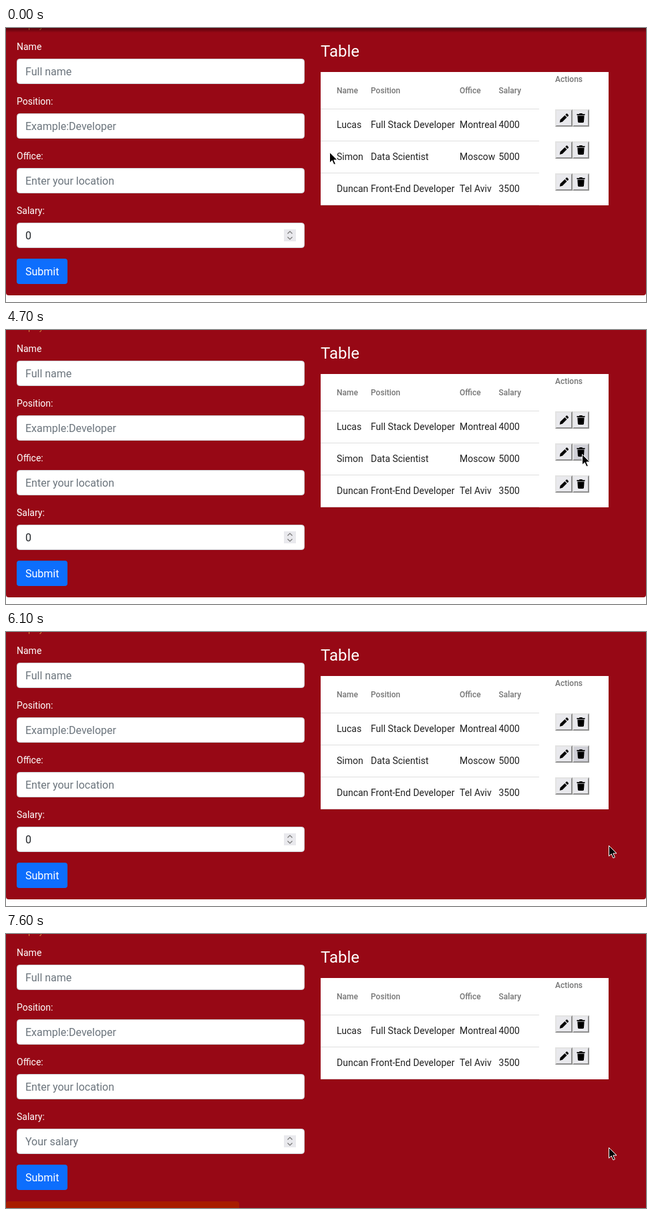
An HTML page that plays this animation: 958x411 px, repeating every 8 s.

```html
<!DOCTYPE html>
<html lang="en">
<head>
<meta charset="utf-8">
<style>
  html, body { margin: 0; width: 100%; height: 100%; overflow: hidden; background: #fff; }
  svg { display: block; width: 958px; height: 411px; font-family: Roboto, sans-serif; white-space: pre; }
  .dialog { font-family: "Noto Sans", sans-serif; }
</style>
</head>
<body>
<svg id="stage" viewBox="0 0 958 411"></svg>
<script>
const LOOP = 8000, STEP = 100;
const RED = '#970815';
const people = [
  ['Lucas', 'Full Stack Developer', 'Montreal', '4000'],
  ['Simon', 'Data Scientist', 'Moscow', '5000'],
  ['Duncan', 'Front-End Developer', 'Tel Aviv', '3500'],
];
const columns = [495, 546, 679, 737.5];
const headers = ['Name', 'Position', 'Office', 'Salary'];

const text = (x, y, str, size, fill, extra = '') =>
  `<text x="${x}" y="${y}" font-size="${size}" fill="${fill}" ${extra}>${str}</text>`;
const rect = (x, y, w, h, fill, extra = '') =>
  `<rect x="${x}" y="${y}" width="${w}" height="${h}" fill="${fill}" ${extra}/>`;
const path = (d, fill, extra = '') => `<path d="${d}" fill="${fill}" ${extra}/>`;
const group = (x, y, body) => `<g transform="translate(${x} ${y})">${body}</g>`;
const bold = 'font-weight="700"', medium = 'font-weight="500"';

const pencil =
  path('M.3 13.7 1.2 9.6 7.9 2.9 11.1 6.1 4.4 12.8z', '#000') +
  path('M8.8 2 10 .8q.9-.9 1.8 0l1.4 1.4q.9.9 0 1.8L12 5.2z', '#000');
const trash =
  path('M0 1.1h3.4l.7-1.1h3.8l.7 1.1H12v1.6H0z', '#000') +
  path('M.9 3.6h10.2l-.6 9q-.1 1.4-1.4 1.4H2.9q-1.3 0-1.4-1.4z', '#000');
const arrow = path('M.5.5V16.2l3.7-3.4 2.7 6.2 2.5-1.1-2.6-5.9H12z', '#000', 'stroke="#fff" stroke-linejoin="round"');
const hand = path('M4 2Q4 .5 5.4.5T6.8 2v4.2l6.6 1.2q2 .4 2 2.2l-.9 4V17H6.2v-2.2L.9 9.9q-.6-1.2.5-1.7 1-.3 2.6 1.5z',
    '#000', 'stroke="#fff" stroke-linejoin="round"') +
  path('M7.3 7v3M10.1 7.6V10M12.7 8.2V10', 'none', 'stroke="#fff" stroke-width=".6"');

function field(label, y, value, filled) {
  return text(16, y - 13, label, 14, '#fff') +
    rect(16.5, y + .5, 430, 37, '#fff', 'rx="4" stroke="#ced4da"') +
    text(29, y + 25, value, 16, filled ? '#212529' : '#6c757d');
}

function button(x, y, w, icon, hovered) {
  return rect(x, y, w, 26, '#e3e3e3') +
    path(`M${x} ${y + 26}h${w}v-26l-2 2v22h${4 - w}z`, '#8f8f8f') +
    rect(x + 2, y + 2, w - 4, 22, hovered ? '#d0d0d7' : '#e9e9ed') +
    group(x + 6.5, y + 6, icon);
}

function table(rows, hoveredRow) {
  let out = rect(471, 66, 431, 56 + rows.length * 48, '#fff') +
    text(822, 81, 'Actions', 12, '#757575', medium);
  headers.forEach((h, i) => out += text(columns[i], 98, h, 12, '#757575', medium));
  rows.forEach((row, r) => {
    const y = 121 + r * 48;
    row.forEach((cell, i) => out += text(columns[i], y + 29, cell, 14, '#212121'));
    out += button(822, y + 1, 26, pencil, false) + button(848, y + 1, 25, trash, r === hoveredRow);
  });
  for (let r = 0; r <= rows.length; r++) out += rect(471, 121 + r * 48, 327, 1, '#e0e0e0');
  return out;
}

function page(t) {
  const deleted = t >= 7200, growing = t >= 7400;
  const hoveredRow = t >= 800 && t < 2400 ? 2 : t >= 3200 && t < 6200 ? 1 : -1;
  const cleared = t >= 6200;
  let out = rect(0, -10, 958, growing ? 430 : 411, RED, 'rx="4"');
  if (growing) {
    const shown = Math.min(1, (t - 7300) / 300);
    out += rect(0, 401, 349, 20, '#a81c00', `rx="4" opacity="${shown}"`);
  }
  out += text(16, 0, 'Employee', 12, '#d08a3c');
  if (t < 4700) out += rect(0, 0, 958, 7, 'url(#shade)');
  out += field('Name', 46, 'Full name') +
    field('Position:', 128, 'Example:Developer') +
    field('Office:', 210, 'Enter your location') +
    field('Salary:', 292, cleared ? 'Your salary' : '0', !cleared) +
    rect(416, 302, 18, 18, '#e9e9ed') +
    path('M421.5 308.5l3.5-3.5 3.5 3.5M421.5 313.5l3.5 3.5 3.5-3.5', 'none', 'stroke="#777" stroke-width="1.2"') +
    rect(16, 346, 76, 38, '#0d6efd', 'rx="4"') +
    text(29, 371, 'Submit', 16, '#fff') +
    text(471, 43, 'Table', 24, '#fff');
  return out + table(deleted ? [people[0], people[2]] : people, hoveredRow);
}

function dialog(y, height, okColor, withCheckbox) {
  const buttonY = height - 51;
  let body = rect(0, 0, 499, height, '#42414d', 'rx="8"') +
    `<g fill="none" stroke="#fbfbfe" stroke-width="1.2"><circle cx="24" cy="25" r="6.8"/>
     <ellipse cx="24" cy="25" rx="3" ry="6.8"/><path d="M17.5 22.8h13M17.5 27.2h13"/></g>` +
    text(36, 30, 'localhost:4200', 14, '#fbfbfe', bold) +
    text(16, 66, 'Are you sure to delete this record?', 13.75, '#fbfbfe');
  if (withCheckbox) {
    body += rect(16.5, 88.5, 15, 15, '#2b2a33', 'rx="2" stroke="#8f8f9d"') +
      text(38, 101, 'Não permitir que localhost:4200 peça novamente', 13.9, '#bfbfc9');
  }
  body += rect(332, buttonY, 90, 35, '#2b2a33', 'rx="4"') +
    rect(430, buttonY, 53, 35, okColor, 'rx="4"') +
    text(377, buttonY + 23, 'Cancelar', 13.2, '#fbfbfe', bold + ' text-anchor="middle"') +
    text(456, buttonY + 23, 'OK', 13.8, '#2b2a33', bold + ' text-anchor="middle"');
  return rect(0, 0, 958, 411, 'rgba(28,27,34,.45)') +
    `<g class="dialog">${group(433, y, body)}</g>`;
}

function dialogs(t) {
  if (t >= 4800 && t < 6100) {
    return dialog(211, 138, t >= 6000 ? '#aaf2ff' : t >= 5700 ? '#80ebff' : '#00ddff', false);
  }
  if (t >= 6200 && t < 7200) return dialog(193, 173, t >= 7100 ? '#aaf2ff' : '#80ebff', true);
  return '';
}

// Start, duration, then the three points of a quadratic curve
const moves = [
  [500, 400, [484, 186], [700, 192], [863, 236]],
  [2300, 100, [863, 236], [844, 222], [824, 218]],
  [2400, 100, [824, 218], [815, 217], [806, 217]],
  [2900, 500, [806, 217], [832, 196], [862, 186]],
  [5300, 600, [862, 186], [925, 255], [902, 320]],
];

function cursor(t) {
  let [x, y] = moves[0][2];
  for (const [start, duration, a, b, c] of moves) {
    if (t < start) break;
    const k = Math.min(1, (t - start + STEP) / duration), e = k * k * (3 - 2 * k);
    [x, y] = [0, 1].map(i => a[i] * (1 - e) ** 2 + 2 * b[i] * e * (1 - e) + c[i] * e * e);
  }
  const overButton = t < 4700 && x >= 822 && x < 873 && y >= 122 && (y - 122) % 48 < 26;
  return overButton ? group(x - 5, y - 1, hand) : group(x, y, arrow);
}

const stage = document.getElementById('stage');
const defs = `<defs><linearGradient id="shade" x2="0" y2="1">
  <stop stop-color="#000" stop-opacity=".45"/><stop offset="1" stop-color="#000" stop-opacity="0"/>
</linearGradient></defs>`;
const origin = performance.now();
let last = -1;

function draw() {
  const elapsed = Math.max(0, performance.now() - origin) % LOOP;
  const t = Math.floor(elapsed / STEP) * STEP;
  if (t !== last) stage.innerHTML = defs + page(t) + dialogs(t) + cursor(t);
  last = t;
  requestAnimationFrame(draw);
}
draw();
</script>
</body>
</html>
```
